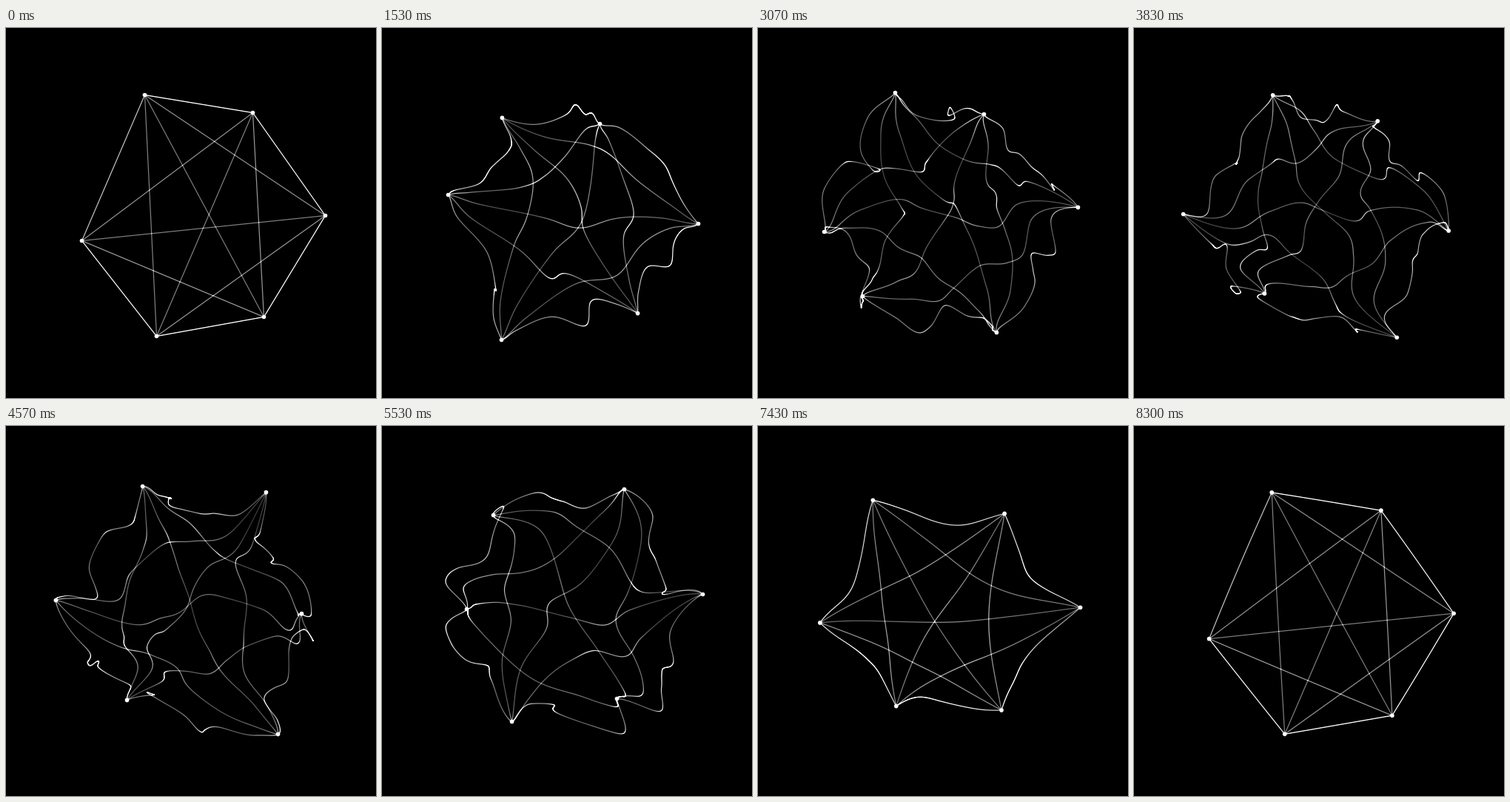
An HTML page with a canvas for the animation above (8.33 s loop, 500 px wide and 500 px high).

```html
<!DOCTYPE html>
<html>
<head>
<meta charset="utf-8">
<title>Delayed network</title>
<style>
html, body { margin: 0; width: 100%; height: 100%; overflow: hidden; background: #000; }
canvas { display: block; width: 500px; height: 500px; }
</style>
</head>
<body>
<canvas id="stage" width="500" height="500"></canvas>
<script>
const LOOP = 8330;
const STEP = LOOP / 250;
const MAX_DELAY = 5400;
const N = 800; // dots per link

const ctx = document.getElementById('stage').getContext('2d');

// Each node wanders on a closed smooth path through these places.
const times = [0, 597, 1162, 1530, 2150, 3070, 3903, 4570, 5530, 6106, 6530, 7670];
const tracks = [
  [187,90, 208,118, 186,131, 162,121, 161,90, 185,87, 187,90, 184,81, 150,120, 166,137, 156,126, 160,95],
  [333,114, 322,126, 303,117, 294,129, 307,110, 305,116, 331,124, 351,89, 327,85, 319,109, 318,130, 335,114],
  [431,253, 418,250, 419,255, 427,264, 411,231, 432,242, 423,274, 399,253, 433,227, 427,256, 408,266, 440,242],
  [348,390, 322,358, 334,372, 345,385, 343,405, 322,411, 357,418, 367,416, 317,368, 305,363, 305,375, 335,385],
  [203,416, 182,391, 160,412, 161,421, 154,393, 141,362, 177,359, 163,370, 175,399, 188,374, 181,366, 190,386],
  [102,287, 118,262, 88,236, 89,225, 74,244, 89,275, 65,249, 67,235, 114,247, 121,250, 113,263, 82,268]
];
const K = times.length;

const timeAt = k => times[(k + K) % K] + Math.floor(k / K) * LOOP;
const valueAt = (track, k, axis) => track[2 * ((k + K) % K) + axis];

// Slope of the parabola through three neighbouring keys
function slope(track, k, axis) {
  const h0 = timeAt(k) - timeAt(k - 1), h1 = timeAt(k + 1) - timeAt(k);
  const v = valueAt(track, k, axis);
  const s0 = (v - valueAt(track, k - 1, axis)) / h0;
  const s1 = (valueAt(track, k + 1, axis) - v) / h1;
  return (s0 * h1 + s1 * h0) / (h0 + h1);
}

const slopes = tracks.map(track =>
  times.map((_, k) => [slope(track, k, 0), slope(track, k, 1)]));

function place(node, time) {
  const t = ((time % LOOP) + LOOP) % LOOP;
  let k = K - 1;
  while (times[k] > t) k--;
  const h = timeAt(k + 1) - times[k];
  const u = (t - times[k]) / h, w = 1 - u;
  const m0 = slopes[node][k], m1 = slopes[node][(k + 1) % K];
  return [0, 1].map(axis =>
    valueAt(tracks[node], k, axis) * w * w * (1 + 2 * u) +
    valueAt(tracks[node], k + 1, axis) * u * u * (3 - 2 * u) +
    h * u * w * (w * m0[axis] - u * m1[axis]));
}

function draw(t) {
  const delay = MAX_DELAY * Math.sin(Math.PI * t / LOOP);
  const trails = tracks.map((_, node) =>
    Array.from({ length: N + 1 }, (_, k) => place(node, t - delay * k / N)));

  ctx.globalCompositeOperation = 'source-over';
  ctx.fillStyle = '#000';
  ctx.fillRect(0, 0, 500, 500);

  // A link blends the pasts of its two ends; slow parts pile up brighter.
  ctx.globalCompositeOperation = 'lighter';
  ctx.fillStyle = 'rgba(255,255,255,0.17)';
  for (let i = 0; i < 6; i++) {
    for (let j = i + 1; j < 6; j++) {
      for (let k = 0; k <= N; k++) {
        const p = k / N, a = trails[i][k], b = trails[j][N - k];
        const x = a[0] + (b[0] - a[0]) * p;
        const y = a[1] + (b[1] - a[1]) * p;
        ctx.fillRect(x - 0.1, y - 0.1, 1.2, 1.2);
      }
    }
  }

  ctx.globalCompositeOperation = 'source-over';
  ctx.fillStyle = '#fff';
  for (const trail of trails) {
    ctx.beginPath();
    ctx.arc(trail[0][0] + 0.5, trail[0][1] + 0.5, 2.8, 0, 2 * Math.PI);
    ctx.fill();
  }
}

const start = performance.now();
let last = -1;
function tick() {
  const now = Math.max(0, performance.now() - start);
  const step = Math.floor((now + 4) / STEP) % 250;
  if (step !== last) draw(step * STEP);
  last = step;
  requestAnimationFrame(tick);
}
tick();
</script>
</body>
</html>
```
